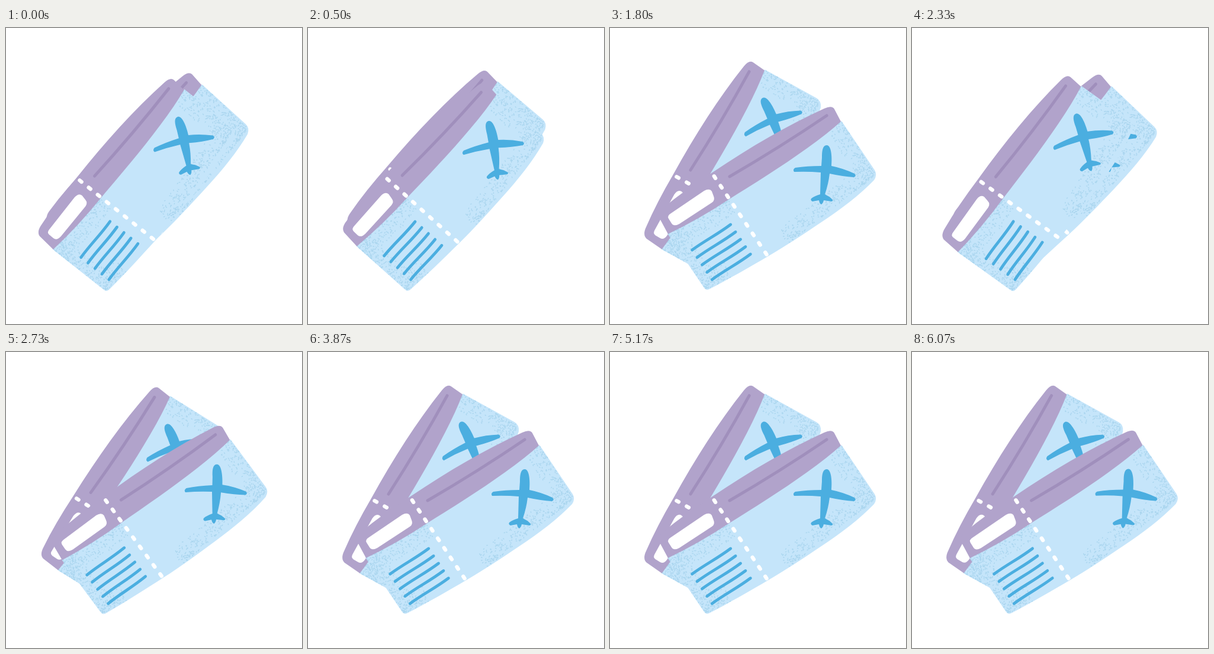
An HTML page with a canvas for the animation above (6.11 s loop, 500 by 500 pixels).

```html
<!DOCTYPE html>
<html lang="en">
<head>
<meta charset="utf-8">
<title>Plane tickets</title>
<style>
  html, body { margin: 0; width: 100%; height: 100%; overflow: hidden; background: #fff; }
  canvas { display: block; width: 100vw; height: 100vh; }
</style>
</head>
<body>
<canvas id="stage"></canvas>
<script>
const LOOP = 6110, CYCLE = 51, SIZE = 500;
const canvas = document.getElementById('stage');
const ctx = canvas.getContext('2d');
const scale = window.devicePixelRatio || 1;
canvas.width = canvas.height = SIZE * scale;

const blue = new Path2D(`M391 157 L447 240 Q452 248 446 257 C422 282 390 306 357 328
  S299 367 268 385 S201 424 168 441 Q162 444 159 439 L97 347 L180 280 Z`);
const purple = new Path2D(`M362 136 C300 164 237 201 173 244 Q126 274 92 302
  Q80 311 83 320 L98 348 Q152 322 200 290 C240 265 290 234 333 203
  Q368 178 390 158 L379 137 Q375 130 362 136 Z`);
const fold = new Path2D('M202 251 Q288 201 366 148');
const label = new Path2D(`M103 313 L159 275 Q168 270 172 276 L175 284 Q178 291 172 295
  L117 331 Q108 336 104 330 L99 322 Q96 317 103 313 Z`);
const plane = new Path2D(`M366 198 C359 198 358 208 358 219 L357 233 Q333 233 313 236
  Q308 239 311 243 Q334 242 356 244 L355 281 Q345 284 340 288 Q338 291 342 293
  L353 291 Q354 297 357 298 Q360 296 361 291 L374 293 Q378 292 375 289
  Q370 284 363 281 Q369 263 371 246 Q394 251 412 252 Q417 250 413 246
  Q394 237 374 233 C375 222 375 198 366 198 Z`);

const stripes = new Path2D();
for (let i = 0; i < 5; i++) {
  const x = 138.7 + i * 8.4, y = 375 + i * 12.5;
  stripes.moveTo(x, y);
  stripes.bezierCurveTo(x + 23, y - 17, x + 41, y - 25, x + 65, y - 43);
}

const dashes = new Path2D();
for (let i = 0; i < 9; i++) {
  const x = 177 + i * 10.8, y = 252 + i * 16.1;
  dashes.moveTo(x - 1.1, y - 1.7);
  dashes.lineTo(x + 1.1, y + 1.7);
}

let seed = 17;
const random = () => (seed = (seed * 16807) % 2147483647) / 2147483647;
const speckles = new Path2D();

// dots that thin out inwards from one edge
function speckle([x1, y1], [x2, y2]) {
  const dx = x2 - x1, dy = y2 - y1, len = Math.hypot(dx, dy);
  for (let i = 0; i < len * 1.5; i++) {
    const u = random(), depth = 28 * random() ** 1.5, a = random() * Math.PI;
    const x = x1 + dx * u - dy / len * depth;
    const y = y1 + dy * u + dx / len * depth;
    speckles.moveTo(x, y);
    speckles.lineTo(x + 1.5 * Math.cos(a), y + 1.5 * Math.sin(a));
  }
}

const rims = [
  [[391, 158], [449, 248], [300, 364]],
  [[205, 421], [162, 441], [98, 348], [200, 290]]
];
for (const rim of rims) {
  for (let i = 1; i < rim.length; i++) speckle(rim[i - 1], rim[i]);
}

function fill(path, color) {
  ctx.fillStyle = color;
  ctx.fill(path);
}

function stroke(path, color, width) {
  ctx.strokeStyle = color;
  ctx.lineWidth = width;
  ctx.stroke(path);
}

function turn(x, y, degrees) {
  ctx.translate(x, y);
  ctx.rotate(degrees * Math.PI / 180);
  ctx.translate(-x, -y);
}

function drawTicket() {
  fill(blue, '#c5e5fa');
  ctx.save();
  ctx.clip(blue);
  stroke(speckles, '#abd6ef', 1.4);
  ctx.restore();
  fill(purple, '#b1a3cb');
  stroke(fold, '#a08fbc', 5);
  fill(label, '#fff');
  stroke(dashes, '#fff', 6.4);
  stroke(stripes, '#4baee0', 4.9);
  fill(plane, '#4baee0');
}

// 25 steps a second shown on a 30 Hz grid
function stepAt(ms) {
  const tick = Math.floor((ms + 4) * 0.03);
  return Math.floor(tick / 6) * 5 + Math.max(0, tick % 6 - 1);
}

const sigmoid = x => 1 / (1 + Math.exp(-x));

// degrees away from open: drift further shut, swing open, rest, snap shut
function swing(step, shut, drift, middle, speed) {
  const s = step % CYCLE;
  const closed = shut + drift * Math.sin(Math.min(s / 8, 1) * Math.PI / 2);
  return closed * sigmoid((middle - s) * speed) + shut * sigmoid((s - CYCLE + 1) * 5);
}

function draw(ms) {
  const step = stepAt(ms);
  ctx.setTransform(scale, 0, 0, scale, 0, 0);
  ctx.fillStyle = '#fff';
  ctx.fillRect(0, 0, SIZE, SIZE);
  ctx.lineCap = 'round';

  ctx.save();
  turn(190, 379, swing(step, 13.4, 1.6, 14.2, 0.5));
  ctx.translate(-66, -11);
  turn(202, 251, -27.1);
  drawTicket();
  ctx.restore();

  ctx.save();
  turn(173, 420, -swing(step, 17.6, 3.4, 13.4, 0.55));
  drawTicket();
  ctx.restore();
}

const start = performance.now();
function frame() {
  draw((performance.now() - start) % LOOP);
  requestAnimationFrame(frame);
}
frame();
</script>
</body>
</html>
```
